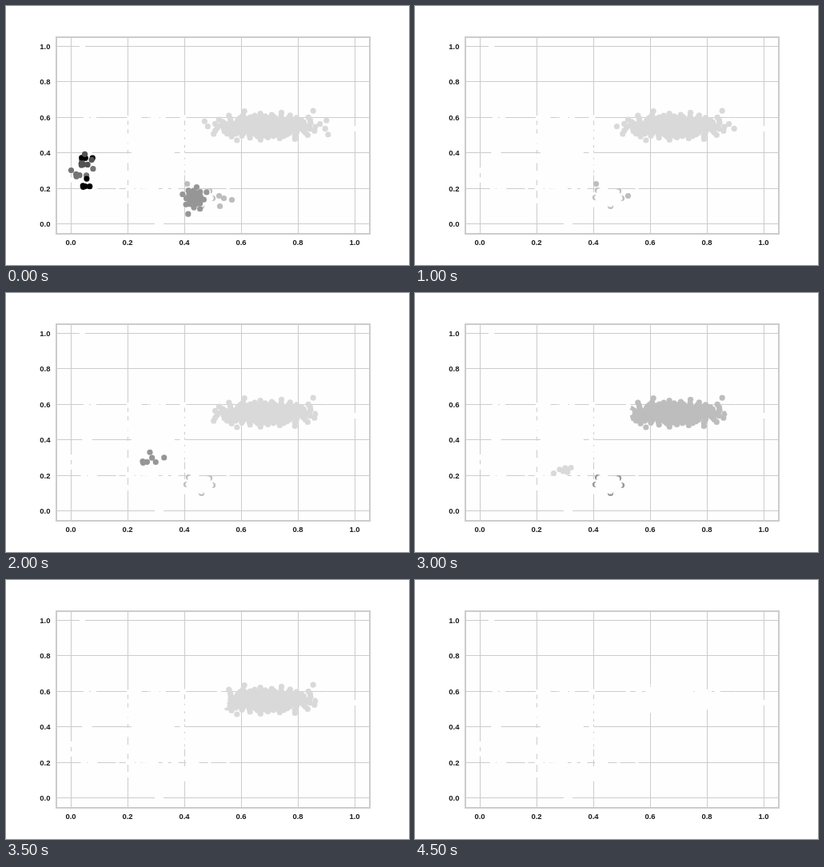
Animation of 504 by 324 pixels, one loop 5 s. Source, as an HTML page with a canvas:

```html
<!DOCTYPE html>
<html lang="en">
<head>
<meta charset="utf-8">
<title>Cluster scatter</title>
<style>
html, body { margin: 0; width: 100%; height: 100%; overflow: hidden; background: #fff; }
canvas { display: block; }
</style>
</head>
<body>
<canvas id="stage" width="504" height="324"></canvas>
<script>
const ctx = document.getElementById('stage').getContext('2d');
const STEP_MS = 500, STEPS = 10, RADIUS = 3.6;
const PAPER = '#fefefe', GRID = '#cccccc', INK = '#1c1c1c';
const [BLACK, DARK, MID, GRAY, SILVER, PALE] =
  ['#000', '#525252', '#737373', '#969696', '#bdbdbd', '#d9d9d9'];

function seeded(seed) {
  return () => {
    seed = (seed * 1664525 + 1013904223) % 4294967296;
    return seed / 4294967296;
  };
}

// Uniform points in a rectangle.
function scatter(count, left, top, right, bottom, seed = 7) {
  const random = seeded(seed);
  return Array.from({ length: count }, () =>
    [left + (right - left) * random(), top + (bottom - top) * random()]);
}

// Normally distributed points, spread evenly by the golden angle.
function bell(count, x, y, spreadX, spreadY) {
  return Array.from({ length: count }, (_, i) => {
    const r = Math.sqrt(-2 * Math.log(1 - (i + 0.5) / count)), angle = i * 2.39996;
    return [x + spreadX * r * Math.cos(angle), y + spreadY * r * Math.sin(angle)];
  });
}

const noise = [
  ...scatter(250, 152, 139, 223, 228),
  ...scatter(24, 82, 183, 114, 228, 3),
  [95, 50], [100, 139], [109, 139], [189, 272], [193, 272],
  [436, 153], [139, 231], [277, 231], [152, 243], [223, 243],
];

// Small clusters are coloured while from <= step < until, then fade into the noise.
const cluster = (color, from, until, dots) => ({ color, from, until, dots });
const smallClusters = [
  cluster(MID, 0, 1, [[81, 205], ...scatter(6, 86, 192, 109, 213)]),
  cluster(BLACK, 0, 1, scatter(3, 93, 186, 117, 190)),
  cluster(DARK, 0, 1, scatter(6, 93, 184, 107, 199)),
  cluster(BLACK, 0, 1, scatter(5, 95, 215, 110, 226)),
  cluster(MID, 1, 2, scatter(4, 152, 203, 164, 215)),
  cluster(GRAY, 3, 5, scatter(7, 169, 198, 198, 212)),
  cluster(PALE, 6, 7, [[173, 225], ...bell(6, 187, 221, 4, 2.5)]),
];

const lowerCore = bell(28, 235, 240, 7, 7.5);
const lowerCenter = [243, 239];
const lowerRim = [[228, 230], [225, 239], [254, 231], [244, 250], [258, 240]];
const lowerOutliers = [[226, 222], [266, 237], [267, 250], [272, 240], [282, 242]];
const upper = bell(320, 324, 150, 29, 6.6);

function dots(color, list) {
  ctx.fillStyle = color;
  for (const [x, y] of list) {
    ctx.beginPath();
    ctx.arc(x + 0.5, y + 0.5, RADIUS, 0, 2 * Math.PI);
    ctx.fill();
  }
}

function drawLower(step, tone) {
  const [cx, cy] = lowerCenter;
  const inward = ([x, y]) => {
    const d = Math.hypot(cx - x, cy - y);
    return [x + 2.5 * (cx - x) / d, y + 2.5 * (cy - y) / d];
  };
  const active = step < 7;
  const outliers = step < 7 ? Math.max(0, 5 - step - (step > 1)) : 0;
  dots(PAPER, lowerCore);
  dots(PAPER, lowerOutliers);
  dots(active ? tone : PAPER, lowerRim);
  dots(PAPER, lowerRim.map(inward));
  dots(active ? tone : PAPER, lowerOutliers.slice(0, outliers));
  if (step < 2) dots(GRAY, lowerCore);
}

// The dense cluster loses its outermost points a little every step.
function drawUpper(step, tone) {
  const left = 239 + 5 * step, right = Math.max(391, 410 - 5 * step);
  const kept = ([x]) => step < 9 && x >= left && x <= right;
  dots(tone, upper.filter(kept));
  dots(PAPER, upper.filter(p => !kept(p)));
}

function drawGrid() {
  ctx.fillStyle = PAPER;
  ctx.fillRect(63, 39, 392, 246);
  ctx.fillStyle = GRID;
  for (let i = 0; i < 6; i++) {
    ctx.fillRect(81 + 71 * i, 39, 1, 246);
    ctx.fillRect(63, Math.round(272.3 - 44.5 * i), 392, 1);
  }
}

function drawFrame() {
  ctx.strokeStyle = GRID;
  ctx.lineWidth = 2;
  ctx.strokeRect(63, 39, 392, 246);
  ctx.font = 'bold 9.5px "Liberation Sans", Arial, sans-serif';
  ctx.fillStyle = INK;
  for (let i = 0; i < 6; i++) {
    const text = (i / 5).toFixed(1);
    ctx.textAlign = 'center';
    ctx.fillText(text, 81 + 71 * i, 298.5);
    ctx.textAlign = 'right';
    ctx.fillText(text, 55.5, 276 - 44.5 * i);
  }
}

function draw(step) {
  ctx.fillStyle = '#fff';
  ctx.fillRect(0, 0, 504, 324);
  drawGrid();
  dots(PAPER, noise);
  for (const { color, from, until, dots: list } of smallClusters)
    dots(step >= from && step < until ? color : PAPER, list);
  // Both large clusters turn a tone darker while a third one follows them.
  const darker = step === 6;
  drawLower(step, darker ? GRAY : SILVER);
  drawUpper(step, darker ? SILVER : PALE);
  drawFrame();
}

let shown = -1;
function tick(now) {
  const step = Math.floor(now / STEP_MS) % STEPS;
  if (step !== shown) draw(shown = step);
  requestAnimationFrame(tick);
}
tick(0);
</script>
</body>
</html>
```
